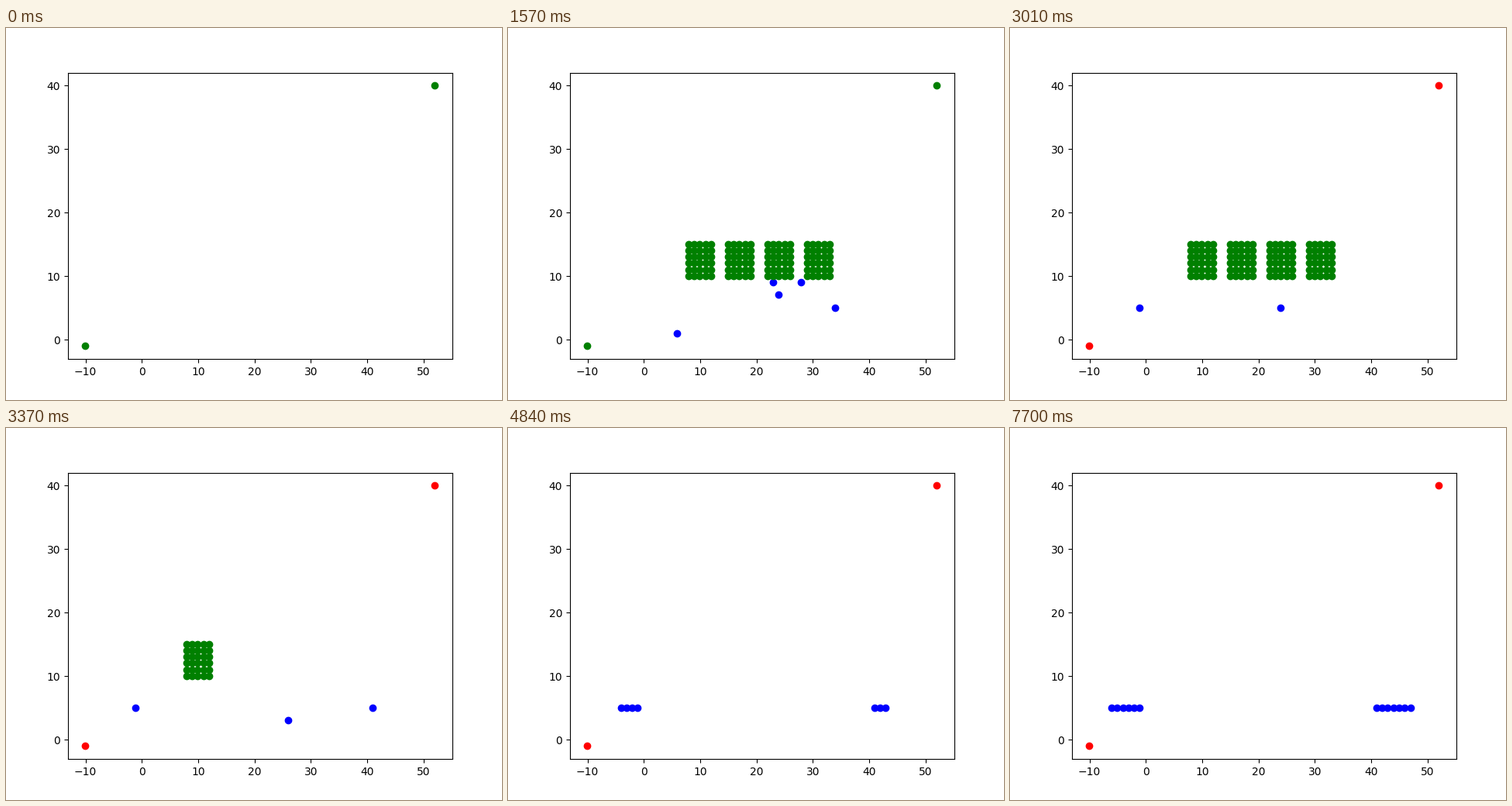
These frames come from a looping animation (640 by 480 pixels, 8 s). A matplotlib script:

```python
import numpy as np
import matplotlib.pyplot as plt
from matplotlib.animation import FuncAnimation
from matplotlib.transforms import ScaledTranslation

LOOP, TICK = 8000, 20      # ms
START, STEP = 370, 120     # ms: first simulation step, step length

# Stops of each walker, taken at consecutive key steps.
KEY_STEPS = [5, 10, 17, 25]
WALKERS = [
    [(6, 9), (6, 1), (3, 7)],
    [(15, 9), (23, 9), (20, 9), (26, 3)],
    [(36, 7), (34, 5)],
    [(20, 1), (24, 7), (11, 5)],
]
LATE_WALKER = [(28, 9)]    # joins at the second key step
WALK = 3                   # steps spent on coming in and on going out

OPENING = [0, 1, 2, 3, 14]  # step at which each block appears
CLOSING = 21

# Arrival times in ms at the two exits.
LEFT_QUEUE = [3010, 3730, 3970, 4840, 5840, 5960]
RIGHT_QUEUE = [3130, 3490, 3610, 5840, 6210, 7580, 7700]


def full_path(stops, first_key=0):
    """Come in along the blocks, visit the stops, leave by the nearer door."""
    steps = KEY_STEPS[first_key:first_key + len(stops)]
    door = (0 if stops[-1][0] < 20 else 40, 5)
    steps = [steps[0] - WALK, *steps, steps[-1] + WALK]
    return steps, [(stops[0][0], 9), *stops, door]


PATHS = [full_path(stops) for stops in WALKERS] + [full_path(LATE_WALKER, 1)]


def walker_points(step):
    points = []
    for steps, stops in PATHS:
        if steps[0] <= step < steps[-1]:
            x, y = (np.interp(step, steps, axis) for axis in zip(*stops))
            points.append((round(x), 2 * round((y - 1) / 2) + 1))
    return points


def queue_points(t):
    left = sum(t >= at for at in LEFT_QUEUE)
    right = sum(t >= at for at in RIGHT_QUEUE)
    return [(-1 - i, 5) for i in range(left)] + [(41 + i, 5) for i in range(right)]


def block_points(step):
    # Blocks are cleared one per step from right to left after closing.
    return [(8 + 7 * b + i, 10 + j)
            for b, opened in enumerate(OPENING)
            if opened <= step <= CLOSING + len(OPENING) - 1 - b
            for i in range(5) for j in range(6)]


fig, ax = plt.subplots(figsize=(6.4, 4.8), dpi=100)
# Half a pixel left and up, so marker centres round down to whole pixels.
nudge = ScaledTranslation(-0.5 / 100, 0.5 / 100, fig.dpi_scale_trans)


def dots(color, points=()):
    line, = ax.plot([], [], "o", color=color, transform=ax.transData + nudge)
    place(line, points)
    return line


def place(line, points):
    line.set_data([x for x, _ in points], [y for _, y in points])


corners = dots("green", [(-10, -1), (52, 40)])
people = dots("blue")
blocks = dots("green")
ax.set_xlim(-13.1, 55.1)
ax.set_ylim(-3.05, 42.05)


def update(frame):
    t = (frame + 0.5) * TICK
    step = int((t - START) // STEP)
    place(people, walker_points(step) + queue_points(t))
    place(blocks, block_points(step))
    corners.set_color("red" if step >= CLOSING else "green")
    return corners, people, blocks


anim = FuncAnimation(fig, update, frames=LOOP // TICK, interval=TICK,
                     repeat=True, repeat_delay=0)
plt.show()
```
